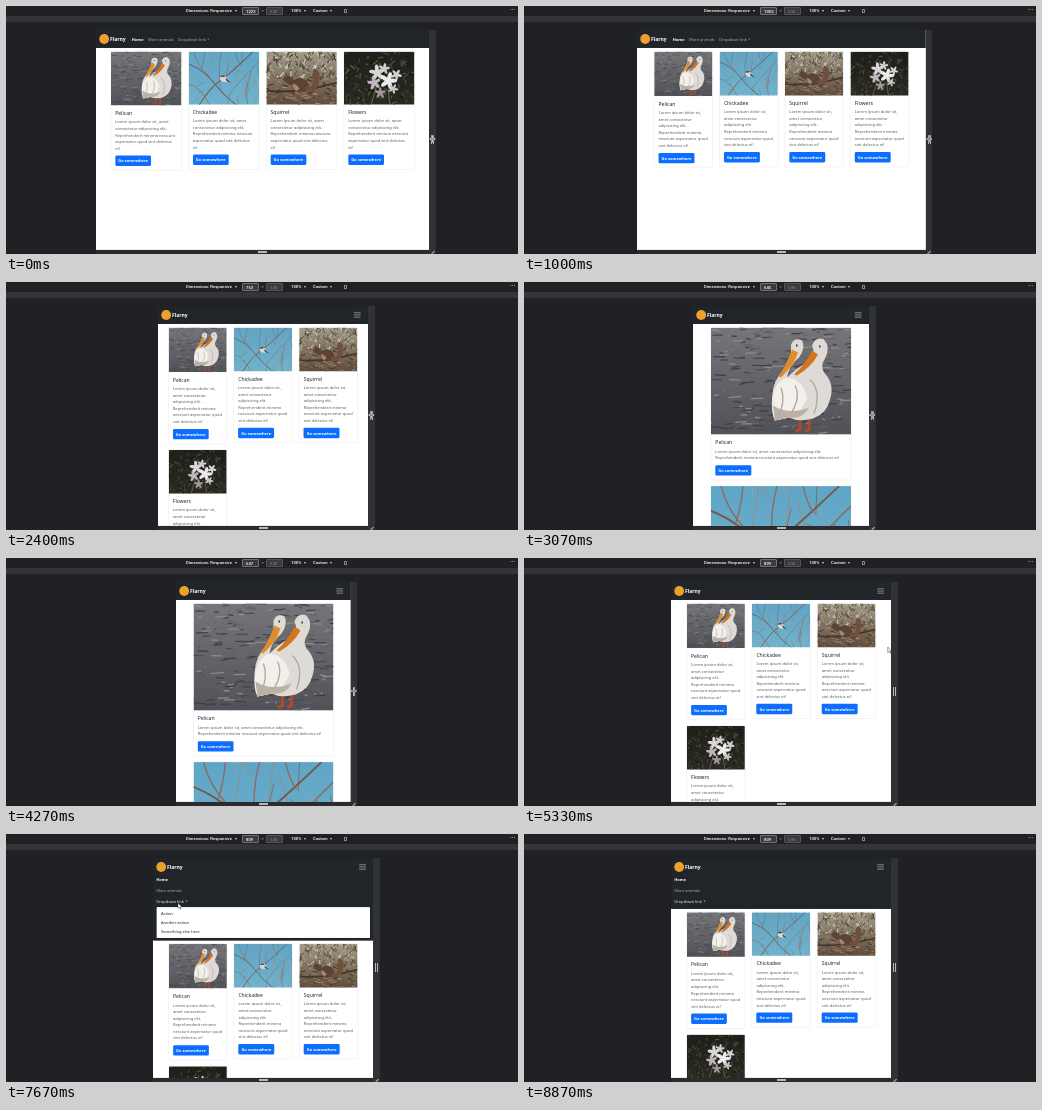
These frames come from a looping animation (512x248 px, 9540 ms). An HTML page:

```html
<!DOCTYPE html>
<html lang="en">
<head>
<meta charset="utf-8">
<title>Responsive card layout</title>
<style>
html, body { margin: 0; width: 100%; height: 100%; overflow: hidden; background: #202124; }
body { position: relative; font-family: "Noto Sans", sans-serif; }
body > * { position: absolute; }
* { box-sizing: border-box; }

/* device toolbar */
#bar { left: 0; top: 0; width: 100%; height: 16px; background: linear-gradient(#202124 10px, #343538 10px);
  font: 500 4.2px/9.5px Roboto, sans-serif; color: #fff; white-space: nowrap; }
#bar > * { position: absolute; top: 0; }
#bar .tri::after { content: ""; display: inline-block; margin-left: 2.6px; vertical-align: .2px;
  border: 1.5px solid transparent; border-top: 2.6px solid #d0d2d5; border-bottom: 0; }
#bar .field { top: 1px; width: 17px; height: 8px; line-height: 7px; padding-left: 3px; border: 1px solid #707276;
  border-radius: 1px; background: #3a3b3e; color: #fff; }
#bar .off { border-color: #515356; color: #77797d; }
#bar .turn { left: 337.5px; top: 2.5px; width: 3.4px; height: 4.6px; border: .6px solid #85878b; border-radius: .6px; }

/* drag edges */
#edge { top: 24px; width: 6.5px; height: 224px; background: #303236; }
#foot { top: 244px; height: 4px; background: #292b2e; }
.grip { position: absolute; border: solid #b5b7ba; }
#edge .grip { left: 2px; top: 105px; width: 2.8px; height: 8.5px; border-width: 0 .9px; }
#foot .grip { left: calc(50% - 4.5px); top: .6px; width: 9px; height: 2.8px; border-width: .9px 0; }
#edge i { position: absolute; right: 1px; bottom: 1.8px; width: 4px; height: .7px; background: #b5b7ba; transform: rotate(-45deg); }

/* web page at device scale */
#page { top: 24px; height: 807px; overflow: hidden; background: #fff; transform: scale(.2725); transform-origin: 0 0;
  container-type: inline-size; font-size: 14.8px; line-height: 24px; color: #212529; }
nav { background: #212529; padding: 8px 12px; color: #fff; box-shadow: 4px 0 #212529, -4px 0 #212529; }
.top { display: flex; align-items: center; height: 50px; }
.logo { width: 36px; height: 36px; border-radius: 50%; background: #eda12c; margin-right: 3px; }
.brand { font-size: 18.5px; font-weight: 600; margin-right: 14px; }
.toggle { margin-left: auto; width: 56px; height: 40px; border: 1px solid #ffffff1a; border-radius: 4px;
  display: grid; place-items: center; }
.toggle svg { width: 30px; stroke: #ffffffb0; stroke-width: 2.4; stroke-linecap: round; }
.ring .toggle { box-shadow: 0 0 0 4px #dfe1e3; }
.wide { display: none; }
.link { padding: 8px 0; color: #ffffff9c; white-space: nowrap; }
.home { color: #fff; font-weight: 600; }
.caret::after { content: ""; display: inline-block; margin-left: 5px; vertical-align: 3px;
  border: 4.8px solid transparent; border-top-color: currentColor; border-bottom: 0; }
.lit .caret { color: #ffffffe0; }
.menu { overflow: hidden; }
.drop { display: none; margin-top: 2px; padding: 8px 0; border: 1px solid #00000026; border-radius: 4px;
  background: #fff; color: #212529; }
.drop div { padding: 4px 16px; }
.dropped .drop { display: block; }

.grid { display: flex; flex-wrap: wrap; align-items: flex-start; width: 540px; margin: 0 auto; }
.card { width: calc(100% - 24px); margin: 12px 12px 9px; border: 1px solid #00000030; border-radius: 5px; overflow: hidden; }
.card svg { display: block; width: 100%; aspect-ratio: 4 / 3; }
.card:first-child svg { aspect-ratio: 140 / 107; }
.body { padding: 16px; }
h5 { margin: 0 0 8px; font-size: 18.5px; line-height: 24px; font-weight: 500; }
p { margin: 0 0 16px; color: #5c5f63; }
.btn { display: inline-block; padding: 7px 11px; border-radius: 5px; background: #0d6efd; color: #fff;
  font-weight: 600; white-space: nowrap; vertical-align: top; }
@container (min-width: 768px) {
  .grid { width: 720px; }
  .card { width: calc(100% / 3 - 24px); }
}
@container (min-width: 992px) {
  .grid { width: 960px; }
  .card { width: calc(25% - 24px); }
  .wide { display: flex; }
  .wide .link { padding: 8px; }
  .toggle, .menu { display: none; }
}
@container (min-width: 1200px) { .grid { width: 1140px; } }

#resize, #arrow { left: 0; top: 0; overflow: visible; width: 8px; height: 8px; }
</style>
</head>
<body>
<div id="bar">
  <span class="tri" style="left:180px">Dimensions: Responsive</span>
  <span class="field" style="left:236px" id="size"></span>
  <span style="left:255.5px;color:#9b9da1">×</span>
  <span class="field off" style="left:260px">530</span>
  <span class="tri" style="left:285px">100%</span>
  <span class="tri" style="left:307px">Custom</span>
  <span class="turn"></span>
  <span style="left:504px;font-size:6px;line-height:6px">···</span>
</div>
<div id="page">
  <nav>
    <div class="top">
      <span class="logo"></span><span class="brand">Flarny</span>
      <div class="wide">
        <span class="link home">Home</span><span class="link">More animals</span><span class="link caret">Dropdown link</span>
      </div>
      <span class="toggle"><svg viewBox="0 0 30 30"><path d="M4 7h22M4 15h22M4 23h22"/></svg></span>
    </div>
    <div class="menu">
      <div class="link home">Home</div>
      <div class="link">More animals</div>
      <div class="link caret">Dropdown link</div>
      <div class="drop"><div>Action</div><div>Another action</div><div>Something else here</div></div>
    </div>
  </nav>
  <div class="grid"></div>
</div>
<div id="edge"><span class="grip"></span><i></i></div>
<div id="foot"><span class="grip"></span></div>
<svg id="resize" viewBox="0 0 8 8"><path d="M-3.2 0l1.6-1.5v1H1.6v-1L3.2 0 1.6 1.5v-1h-3.2v1zM-.6-3.8H.6v7.6H-.6z" fill="#fff" stroke="#222" stroke-width=".3"/></svg>
<svg id="arrow" viewBox="0 0 8 8"><path d="M0 0v5.4l1.3-1.2.9 2 .9-.4-.9-1.9h1.7z" fill="#fff" stroke="#111" stroke-width=".4"/></svg>

<script>
const LOOP = 9540, STEP = 1000 / 15, LAG = 30, SCALE = .2725, CENTER = 257;
const $ = s => document.querySelector(s);

// Scattered short strokes for water, twigs, leaves and grass
function strokes(n, seed, colors, [x, y, w, h], dx, dy, width) {
  const rnd = () => (seed = seed * 16807 % 2147483647) / 2147483647;
  let out = "";
  for (let i = 0; i < n; i++) {
    const color = colors[i % colors.length];
    out += `<path d="M${(x + rnd() * w).toFixed(1)} ${(y + rnd() * h).toFixed(1)}l${((rnd() - .5) * dx).toFixed(1)} ${((rnd() - .5) * dy).toFixed(1)}" stroke="${color}" stroke-width="${width}"/>`;
  }
  return out;
}
const fill = (d, color) => `<path d="${d}" fill="${color}" stroke="none"/>`;
const line = (d, color, width) => `<path d="${d}" stroke="${color}" stroke-width="${width}"/>`;
const back = (id, a, b) => `<linearGradient id="${id}" x2="0" y2="1"><stop stop-color="${a}"/><stop offset="1" stop-color="${b}"/></linearGradient><rect width="140" height="107" fill="url(#${id})"/>`;
const shrink = (art, k, x, y) => `<g transform="translate(${x} ${y}) scale(${k}) translate(${-x} ${-y})">${art}</g>`;

const pelican = back("water", "#75757a", "#515258")
  + strokes(300, 71, ["#4a4b52", "#8b8b8e", "#3e4047", "#66625f"], [-6, 0, 150, 107], 26, 2.5, 1.3)
  + line("M89 86v16l-5 2M98 86v16l-4 2", "#b5472c", 2.8)
  + fill("M80 17Q84 9 91 13Q95 20 88 30Q78 38 76 50Q88 38 100 33Q105 28 101 18Q105 8 113 12Q120 20 114 31Q109 38 113 45Q124 56 119 72Q116 86 102 91Q88 95 78 90L64 93Q60 86 61 70Q62 52 72 44Q77 32 80 26Z", "#dedad5")
  + fill("M76 50Q92 52 96 70Q92 84 78 90L64 93Q60 84 62 68Q65 54 76 50Z", "#f3efeb")
  + fill("M62 78Q78 88 98 80Q92 92 78 90L64 93Z", "#bdb1a6")
  + line("M99 52Q111 64 103 86M84 58Q90 70 80 86M70 60Q75 74 67 90", "#b3aba3", 1.4)
  + fill("M81 22L87 25Q83 38 70 50L67 49Q77 36 81 22Z", "#e28b27")
  + fill("M101 23L107 27Q100 40 86 48L83 47Q95 36 101 23Z", "#d5741f")
  + line("M85 18h1.5M108 19h1.5", "#35302c", 2);

const bird = fill("M58 55Q62 43 74 45Q82 48 84 56L96 68L80 64Q64 68 58 55Z", "#dcd9d2")
  + fill("M60 49Q65 40 75 45L74 49Q66 48 60 49ZM76 51L97 69L80 62Z", "#35383e");
const chickadee = back("sky", "#5fa5c6", "#70b3cd")
  + strokes(34, 2203, ["#a08a7f", "#7d6a64", "#b39a8b"], [0, -5, 140, 115], 34, 74, .9)
  + line("M-2 24Q30 36 50 62T96 107M20 107Q44 70 62 58T128 0", "#77594f", 2)
  + line("M10 0Q18 30 42 50M32 0Q30 22 25 36M66 0Q58 30 62 58M92 0Q96 18 103 27M140 20Q112 46 78 88M0 66Q22 66 42 107M118 107Q110 84 124 38", "#8a6d61", 1.4)
  + line("M48 0Q46 20 40 44M80 0L73 52M0 44L26 64M136 58L106 80M128 107L140 78M2 107L30 86", "#a3887c", .9)
  + shrink(bird, .62, 67, 53);

const critter = fill("M26 54Q33 40 43 47L52 56Q66 46 80 56Q91 66 85 83L57 84L62 75Q52 78 50 69Q35 66 26 54Z", "#5d4333")
  + fill("M78 72Q100 78 96 52Q91 33 104 30Q118 38 110 64Q104 88 80 83Z", "#704f3b")
  + fill("M49 64Q60 66 65 76L57 82Q50 76 49 64Z", "#a58870")
  + line("M34 45l1-6M37 53h1.5", "#3a2a20", 2);
const squirrel = back("bank", "#a39b8a", "#5f4b3b")
  + strokes(170, 313, ["#ded8cc", "#4f5a35", "#6b5a49", "#b8ad95", "#3f372c"], [0, 0, 140, 52], 16, 22, 2)
  + strokes(130, 91, ["#8f765a", "#3f3227", "#a38b6e", "#5c4a3a"], [0, 52, 140, 56], 26, 8, 2.2)
  + line("M0 78Q60 84 140 62", "#453626", 4)
  + shrink(critter, .85, 70, 60);

const petal = (x, y, r, color) => [0, 72, 144, 216, 288].map(a =>
  `<ellipse cx="${x}" cy="${y - r * .6}" rx="${r * .3}" ry="${r * .65}" fill="${color}" stroke="none" transform="rotate(${a + x} ${x} ${y})"/>`).join("");
const flowers = back("shade", "#1d211a", "#2b2922")
  + strokes(120, 519, ["#3c4930", "#12150f", "#566243", "#4d443c"], [0, 0, 140, 105], 22, 22, 2.2)
  + line("M72 38Q66 66 54 105M90 60Q86 86 92 105", "#5d7147", 2)
  + petal(66, 42, 13, "#d9d5d8") + petal(88, 58, 14, "#eceaea") + petal(60, 62, 11, "#c3b6c0")
  + petal(80, 34, 9, "#d0cfcd") + petal(72, 82, 9, "#a8979f") + petal(104, 46, 9, "#d4d3d0") + petal(98, 74, 8, "#c9c4c8");

const LOREM = "Lorem ipsum dolor sit, amet consectetur adipisicing elit. Reprehenderit minima nesciunt aspernatur quod sint delectus et!";
$(".grid").innerHTML = Object.entries({ Pelican: pelican, Chickadee: chickadee, Squirrel: squirrel, Flowers: flowers })
  .map(([name, art]) => `<div class="card"><svg viewBox="0 0 140 ${name === "Pelican" ? 107 : 105}" preserveAspectRatio="none" fill="none">${art}</svg>
    <div class="body"><h5>${name}</h5><p>${LOREM}</p><span class="btn">Go somewhere</span></div></div>`).join("");

// Keys are [time, ...values], joined by straight lines
function along(keys, t) {
  const i = keys.findIndex(k => k[0] > t);
  if (i < 0) return keys.at(-1).slice(1);
  if (!i) return keys[0].slice(1);
  const a = keys[i - 1], b = keys[i], f = (t - a[0]) / (b[0] - a[0]);
  return a.slice(1).map((v, j) => v + (b[j + 1] - v) * f);
}
const WIDTHS = [[0, 1223], [1000, 1055], [2000, 870], [2400, 763], [3000, 648], [3800, 606], [4067, 606], [4267, 647], [5067, 809]];
const POINTER = [[5067, 370, 133], [5667, 356, 34], [6267, 356, 34], [6533, 304, 88], [6867, 222, 98], [7200, 173, 68],
  [7267, 173, 68], [7333, 172, 69], [8600, 172, 69], [8867, 24, 246]];

const page = $("#page"), edge = $("#edge"), foot = $("#foot"), menu = $(".menu");
const widthAt = t => Math.round(along(WIDTHS, t)[0]);
const place = (el, x, y, show) => {
  el.style.transform = `translate(${x}px, ${y}px)`;
  el.style.display = show ? "block" : "none";
};

function draw(time) {
  const t = Math.floor((time + 4) / STEP) * STEP;
  // The page follows the number in the toolbar a moment later
  const width = widthAt(t - LAG);
  const left = Math.round(CENTER - width * SCALE / 2), right = left + width * SCALE;
  page.style.width = width + "px";
  page.style.left = left + "px";
  edge.style.left = right + "px";
  foot.style.left = left + "px";
  foot.style.width = right - left + "px";
  $("#size").textContent = widthAt(t);

  const p = Math.min(1, Math.max(0, (t - 5800) / 333));
  const dropped = t > 7660 && t < 8460;
  menu.style.height = p * p * (3 - 2 * p) * 120 + (dropped ? 116 : 0) + "px";
  page.classList.toggle("ring", t > 5860 && t < 7660);
  page.classList.toggle("lit", t > 7190);
  page.classList.toggle("dropped", dropped);

  const [x, y] = along(POINTER, t);
  place($("#resize"), right + 3.2, 133, t < 5130);
  place($("#arrow"), x, y, t >= 5130 && t < 8860);
}

const start = performance.now();
function tick() {
  draw((performance.now() - start) % LOOP);
  requestAnimationFrame(tick);
}
tick();
</script>
</body>
</html>
```
